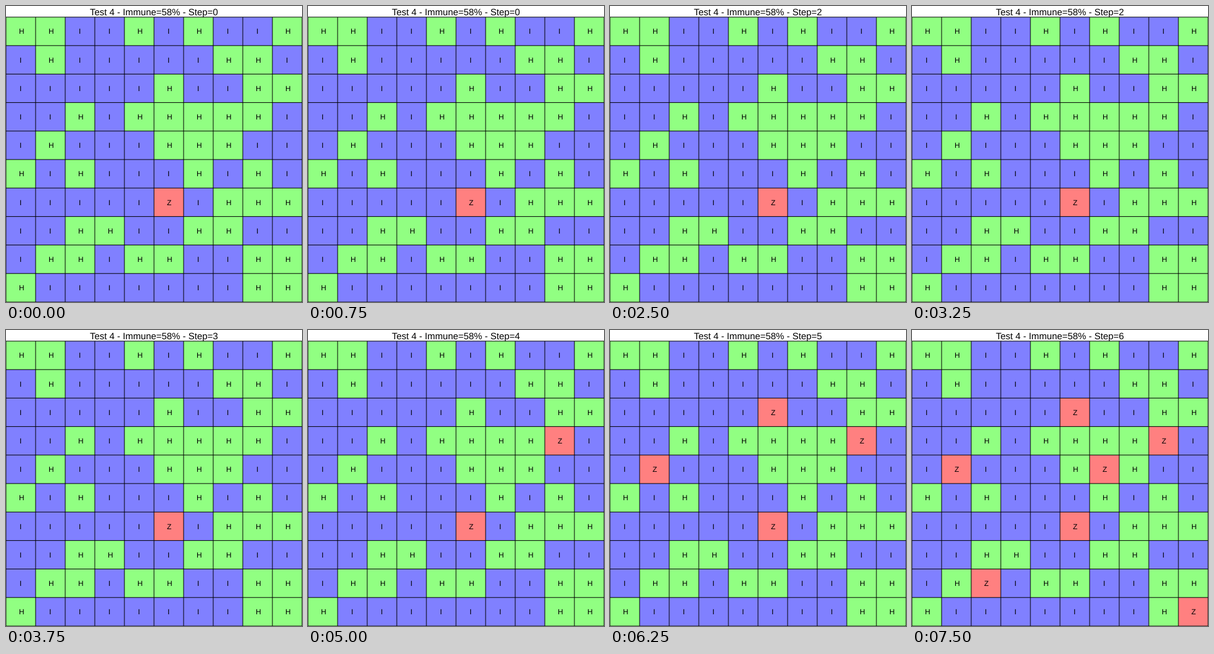
A matplotlib script for the animation above (8000 ms loop, 480x480 px).

```python
import matplotlib.pyplot as plt
from matplotlib.animation import FuncAnimation
from matplotlib.patches import Rectangle

SIZE, DPI = 480, 100
PX = 72 / DPI              # points per pixel
TICK = 250                 # ms
TICKS_PER_STEP = 5
TICKS = 32
TOP, CELL_W, CELL_H = 18, 48, 46.2
FONT = "Liberation Sans"
COLORS = {"H": "#91ff82", "I": "#8080ff", "Z": "#ff8080"}

START = [
    "HHIIHIHIIH",
    "IHIIIIIHHI",
    "IIIIIHIIHH",
    "IIHIHHHHHI",
    "IHIIIHHHII",
    "HIHIIIHIHI",
    "IIIIIZIHHH",
    "IIHHIIHHII",
    "IHHIHHIIHH",
    "HIIIIIIIHH",
]
# (row, column): step at which the cell turns into a zombie
TURNS = {(3, 8): 4, (2, 5): 5, (4, 1): 5, (4, 6): 6, (8, 2): 6, (9, 9): 6}

plt.rcParams["text.hinting"] = "none"
fig = plt.figure(figsize=(SIZE / DPI, SIZE / DPI), dpi=DPI, facecolor="white")
ax = fig.add_axes([0, 0, 1, 1])
ax.set_xlim(0, SIZE)
ax.set_ylim(SIZE, 0)
ax.axis("off")


def label(x, baseline, text, px):
    return ax.text(x, baseline, text, fontfamily=FONT, fontsize=px * PX,
                   color="black", ha="center", va="baseline")


def rule(xs, ys):
    ax.plot(xs, ys, color="black", lw=PX, snap=False,
            solid_capstyle="butt", zorder=2)


title = label(SIZE / 2 - 0.5, 15, "", 15)
cells = {}
for r, row in enumerate(START):
    for c, state in enumerate(row):
        x, y = c * CELL_W, TOP + r * CELL_H
        box = ax.add_patch(Rectangle((x, y), CELL_W, CELL_H, lw=0, snap=True))
        cells[r, c] = box, label(x + CELL_W / 2, y + 27.4, state, 12)

# Lines are centred on the cell borders, so they blend into both neighbours
for k in range(11):
    x, y = k * CELL_W, TOP + k * CELL_H
    rule([x, x], [TOP, SIZE])
    rule([0, SIZE], [y, y])


def draw(tick):
    step = tick // TICKS_PER_STEP
    title.set_text(f"Test 4 - Immune=58% - Step={step}")
    for (r, c), (box, letter) in cells.items():
        turned = step >= TURNS.get((r, c), TICKS)
        state = "Z" if turned else START[r][c]
        box.set_facecolor(COLORS[state])
        letter.set_text(state)
    return []


anim = FuncAnimation(fig, draw, frames=TICKS, interval=TICK,
                     init_func=lambda: draw(0), repeat=True)
plt.show()
```
